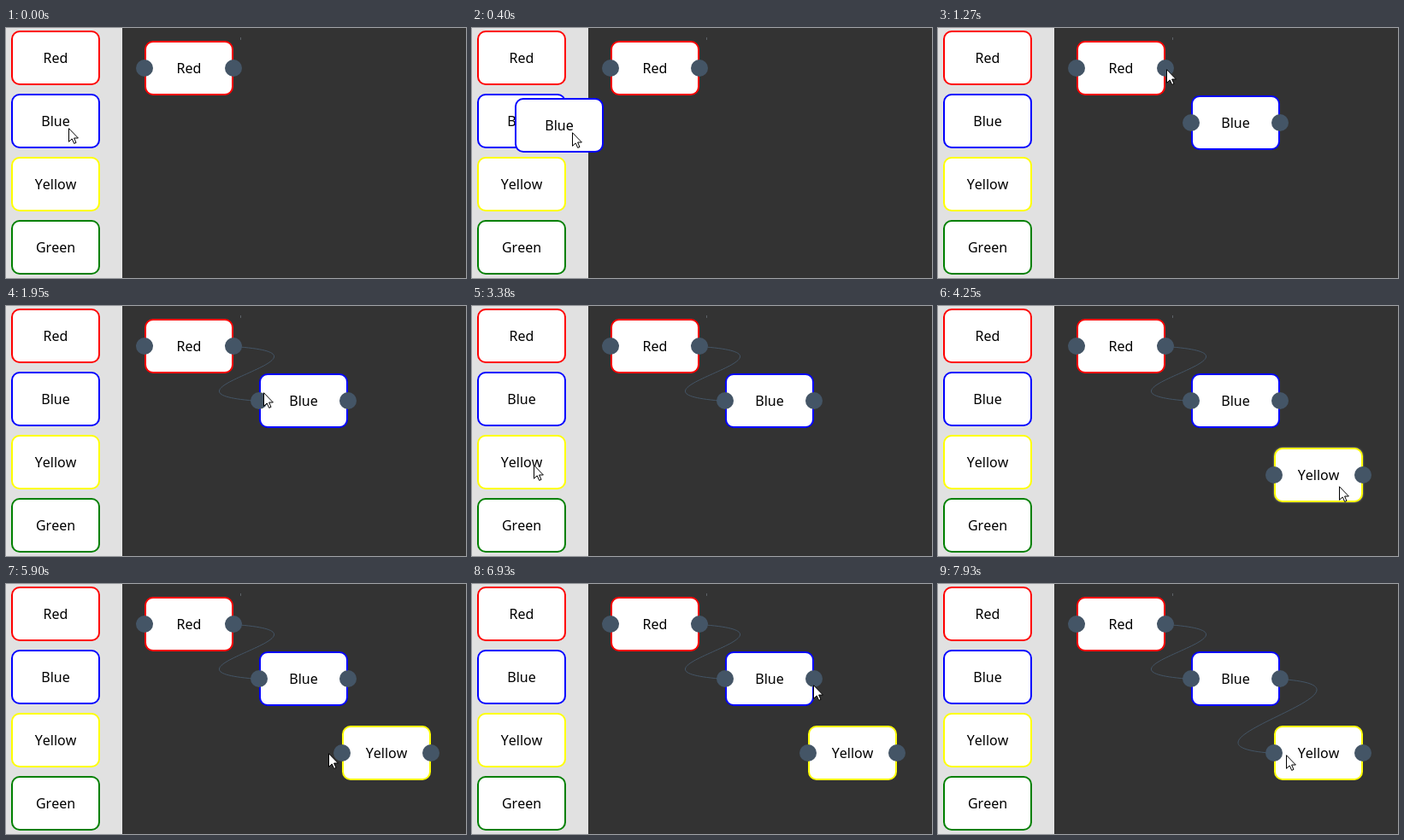
An HTML page for the animation above (8000 ms loop, 538 by 293 pixels).

```html
<!DOCTYPE html>
<html lang="en">
<head>
<meta charset="utf-8">
<title>Node editor</title>
<style>
  html, body { margin: 0; width: 100%; height: 100%; overflow: hidden; background: #333; }
  svg { display: block; width: 538px; height: 293px; }
  text { font: 16px "Noto Sans", "Open Sans", sans-serif; text-anchor: middle; font-kerning: none; }
  .box { fill: #fff; stroke-width: 2; }
  .hover .box { filter: drop-shadow(0 0 1px #999); }
  .wire { fill: none; stroke: #456; }
  .hidden { display: none; }
  circle { fill: #456; }
</style>
</head>
<body>
<svg id="stage" viewBox="0 0 538 293">
  <rect width="538" height="293" fill="#333"/>
  <rect width="136" height="293" fill="#e1e1e1"/>
  <rect x="274" y="11" width="1" height="3" fill="#5c6266"/>
</svg>
<script>
const LOOP = 8000;
const STEP = 130;
const W = 104, H = 64;
const stage = document.getElementById('stage');

function add(parent, tag, attrs) {
  const el = document.createElementNS('http://www.w3.org/2000/svg', tag);
  for (const key in attrs) el.setAttribute(key, attrs[key]);
  parent.appendChild(el);
  return el;
}

const move = (el, x, y) => el.setAttribute('transform', `translate(${x} ${y})`);
const show = (el, on) => el.classList.toggle('hidden', !on);

// A labelled card; nodes on the canvas also carry two ports.
function card(name, x, y, ports) {
  const g = add(stage, 'g', {});
  add(g, 'rect', { class: 'box', x: 1, y: 1, width: W - 2, height: H - 2, rx: 9, stroke: name.toLowerCase() });
  add(g, 'text', { x: W / 2, y: 38 }).textContent = name;
  if (ports) for (const cx of [0, W]) add(g, 'circle', { cx, cy: H / 2, r: 10 });
  move(g, x, y);
  return g;
}

const inPort = n => [n.x, n.y + H / 2];
const outPort = n => [n.x + W, n.y + H / 2];

function wirePath([x1, y1], [x2, y2]) {
  const dip = y1 < y2 ? 10 : -10;
  return `M${x1} ${y1}C${x1 + 150} ${y1 + dip} ${x2 - 150} ${y2 - dip} ${x2} ${y2}`;
}

// Pointer gestures: each eases from the previous place to (x, y), bulging by "bow".
const gestures = [
  { start: 0, end: 837, x: 373, y: 129, bow: [0, 8] },
  { start: 837, end: 1270, x: 267, y: 48 },
  { start: 1270, end: 1950, x: 301, y: 101 },
  { start: 2550, end: 3380, x: 72, y: 186, bow: [0, 45] },
  { start: 3620, end: 4250, x: 469, y: 211, bow: [0, 10] },
  { start: 4250, end: 5090, x: 406, y: 114 },
  { start: 5230, end: 5900, x: 377, y: 198, bow: [45, 0] },
  { start: 5900, end: 6930, x: 399, y: 118, bow: [25, 25] },
  { start: 6930, end: 7930, x: 407, y: 200, bow: [-10, 0] }
];
const [dragBlue, , linkBlue, , dragYellow, , , , linkYellow] = gestures;

const red = { x: 162, y: 15 };
const blue = { name: 'Blue', x: 296, y: 79, by: dragBlue, grab: [67, 40] };
const yellow = { name: 'Yellow', x: 393, y: 166, by: dragYellow, grab: [66, 35] };
const drops = [blue, yellow];
const wires = [
  { from: outPort(red), to: inPort(blue), by: linkBlue, grab: [-1, -1] },
  { from: outPort(blue), to: inPort(yellow), by: linkYellow, grab: [1, -7] }
];

for (const w of wires) {
  w.path = add(stage, 'path', { class: 'wire' });
  move(w.path, .5, .5);
}
['Red', 'Blue', 'Yellow', 'Green'].forEach((name, i) => card(name, 6, 3 + 74 * i));
card('Red', red.x, red.y, true);
for (const d of drops) {
  d.node = card(d.name, d.x, d.y, true);
  d.ghost = card(d.name, 0, 0);
}
const plug = add(stage, 'circle', { r: 10 });
const pointer = add(stage, 'path', {
  d: 'M.5 .7V16.3L4.2 12.9L6.7 18.4L9 17.4L6.6 12H11.4Z', fill: '#fff', stroke: '#000'
});

const ease = p => p < .5 ? 4 * p ** 3 : 1 - 4 * (1 - p) ** 3;

// Progress of a gesture, 0 to 1, held between screen updates.
function progress({ start, end }, t) {
  const n = Math.round((end - start) / STEP);
  const p = Math.floor((t - start) / (end - start) * n + .01) / n;
  return Math.max(0, Math.min(1, p));
}

function pointerAt(t) {
  let x = 73, y = 117;
  for (const g of gestures) {
    const k = ease(progress(g, t));
    const [bx, by] = g.bow || [0, 0];
    const bulge = Math.sin(Math.PI * k);
    x += (g.x - x) * k + bx * bulge;
    y += (g.y - y) * k + by * bulge;
  }
  return [Math.round(x), Math.round(y)];
}

function draw(t) {
  const [x, y] = pointerAt(t);
  let linking = false;

  for (const w of wires) {
    const p = progress(w.by, t);
    const held = p > 0 && p < 1;
    const tip = held ? [x + w.grab[0], y + w.grab[1]] : w.to;
    show(w.path, p > 0);
    w.path.setAttribute('d', wirePath(w.from, tip));
    if (held) {
      linking = true;
      move(plug, ...tip);
    }
  }
  for (const d of drops) {
    const p = progress(d.by, t);
    const inside = Math.abs(x - d.x - W / 2) < 37 && Math.abs(y - d.y - H / 2) < H / 2;
    show(d.ghost, p > 0 && p < 1);
    show(d.node, p === 1);
    move(d.ghost, x - d.grab[0], y - d.grab[1]);
    d.node.classList.toggle('hover', inside && !linking);
  }
  show(plug, linking);
  move(pointer, x, y);
}

const began = performance.now();
function tick() {
  draw((performance.now() - began) % LOOP);
  requestAnimationFrame(tick);
}
tick();
</script>
</body>
</html>
```
